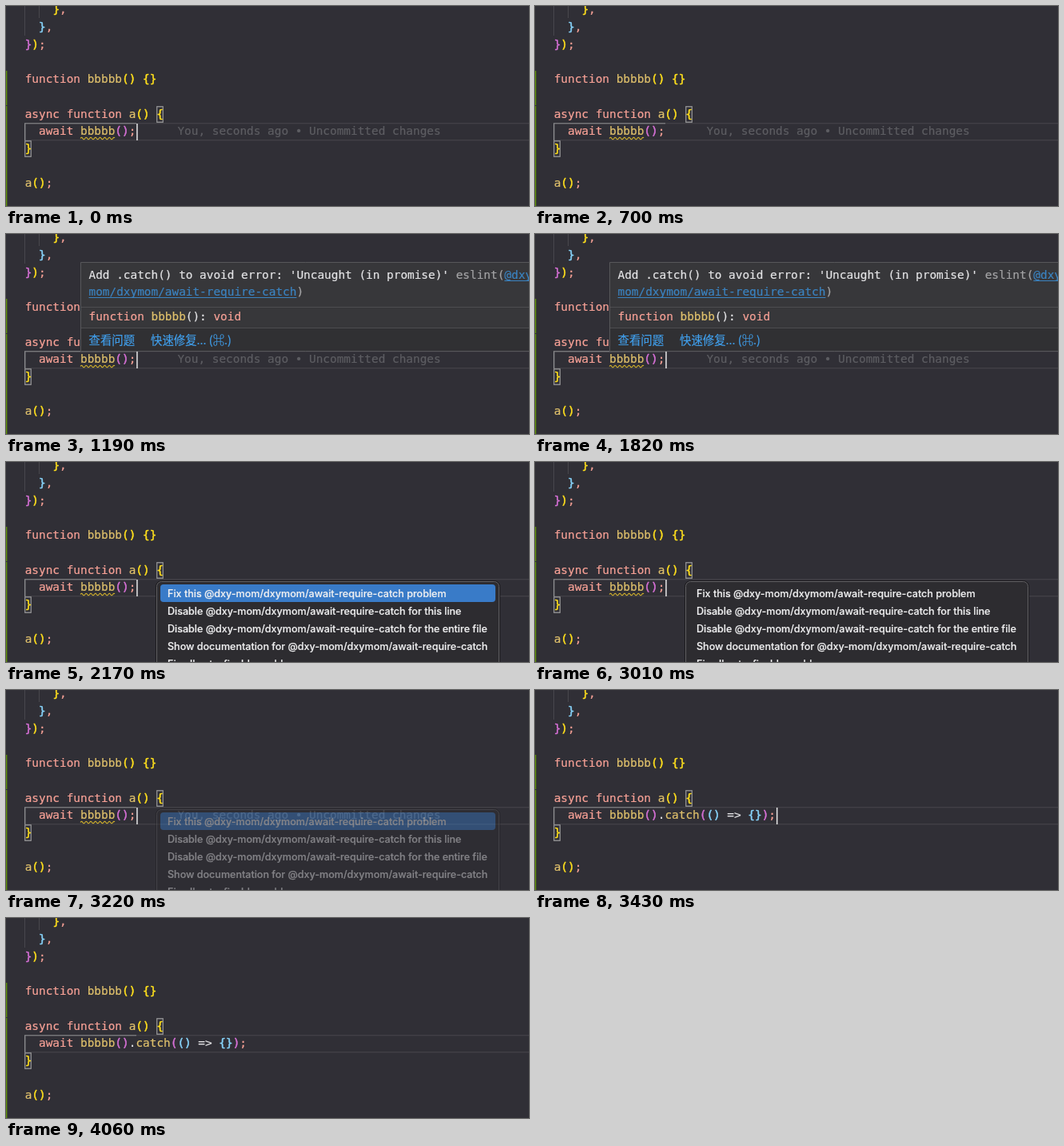
An HTML page with a canvas that plays this animation: 654 px wide and 250 px high, repeating every 4.2 s.

```html
<!DOCTYPE html>
<html lang="en">
<head>
<meta charset="utf-8">
<title>Editor quick fix</title>
<style>
  html, body { margin: 0; width: 100%; height: 100%; overflow: hidden; background: #302f36; }
  canvas { display: block; }
</style>
</head>
<body>
<canvas id="stage" width="654" height="250"></canvas>
<script>
const ctx = document.getElementById('stage').getContext('2d');

const LOOP = 4200;
const HOVER_IN = 960, MENU_IN = 1960, SELECT = 2100;
const FLASH_OFF = 3010, FLASH_ON = 3080, MENU_OUT = 3150, MENU_GONE = 3275;
const EDIT = 3430, LAST_BLINK = 3850;

const MONO = '14.4px "DejaVu Sans Mono", monospace';
const MENU = '500 12.56px Inter, sans-serif';
const ACTION = '14.4px "Noto Sans CJK SC", "Noto Sans CJK", "DejaVu Sans", sans-serif';

const LEFT = 23.7, COLUMN = 8.669, ROW = 21.7, HAIRLINE = 1.4;
const KEY = '#f7a196', NAME = '#e0c16c', PLAIN = '#e4e4e6', LINK = '#3b83c0';
const GOLD = '#ffdf1c', ORCHID = '#d670d6', SKY = '#87d3fa';

const column = n => LEFT + n * COLUMN;
const center = row => 4.8 + row * ROW;
const clamp = v => Math.max(0, Math.min(1, v));

function rect(x, y, w, h, color) {
  ctx.fillStyle = color;
  ctx.fillRect(x, y, w, h);
}

function outline(x, y, w, h, color, width = 1) {
  ctx.strokeStyle = color;
  ctx.lineWidth = width;
  ctx.strokeRect(x + width / 2, y + width / 2, w - width, h - width);
}

function rounded(x, y, w, h, r, fill, stroke) {
  ctx.beginPath();
  ctx.roundRect(x, y, w, h, r);
  ctx.fillStyle = fill;
  ctx.fill();
  if (stroke) {
    ctx.strokeStyle = stroke;
    ctx.lineWidth = 1;
    ctx.stroke();
  }
}

// Draws alternating color and text arguments; returns the end position.
// A thin stroke gives glyphs a smoothed weight, heavier for bracket colors.
function write(x, baseline, ...parts) {
  for (let i = 0; i < parts.length; i += 2) {
    const [color, text] = parts.slice(i, i + 2);
    ctx.fillStyle = ctx.strokeStyle = color;
    ctx.lineWidth = [GOLD, ORCHID, SKY].includes(color) ? .5 : .2;
    ctx.fillText(text, x, baseline);
    ctx.strokeText(text, x, baseline);
    x += ctx.measureText(text).width;
  }
  return x;
}

const code = (row, col, ...parts) => write(column(col), center(row) + 4.6, ...parts);

function squiggle(x1, x2, y) {
  ctx.beginPath();
  for (let x = x1; x <= x2; x += .5) ctx.lineTo(x, y - 1.2 * Math.sin((x - x1) * Math.PI / 2.9));
  ctx.strokeStyle = '#d0b02c';
  ctx.lineWidth = 1.1;
  ctx.stroke();
}

function cursorVisible(t) {
  if (t >= EDIT) return t < LAST_BLINK;
  return t >= MENU_IN || (t + 245) % 1000 < 500;
}

function drawEditor(t) {
  const edited = t >= EDIT;
  ctx.font = MONO;
  ctx.lineJoin = 'round';
  rect(0, 0, 654, 250, '#302f36');
  rect(0, 81, HAIRLINE, 43, '#5f8f0c');
  rect(0, 125, HAIRLINE, 125, '#5f8f0c');
  rect(23, 0, 1, 37, '#48474d');
  rect(41, 0, 1, 15, '#48474d');

  rect(24, 146, 630, HAIRLINE, '#414046');
  rect(24, 167, 630, HAIRLINE, '#414046');
  rect(23, 146, HAIRLINE, 22, '#8b8b8d');
  rect(23, 146, 140, HAIRLINE, '#77777a');
  outline(188, 125, 9, 21, '#8b8b8d', HAIRLINE);
  outline(23, 168, 9, 21, '#8b8b8d', HAIRLINE);

  code(0, 4, GOLD, '}', KEY, ',');
  code(1, 2, SKY, '}', KEY, ',');
  code(2, 0, ORCHID, '}', GOLD, ')', KEY, ';');
  code(4, 0, KEY, 'function ', NAME, 'bbbbb', GOLD, '() {}');
  code(6, 0, KEY, 'async function ', NAME, 'a', GOLD, '() {');
  code(7, 2, KEY, 'await ', NAME, 'bbbbb', ORCHID, '()');
  code(8, 0, GOLD, '}');
  code(10, 0, NAME, 'a', GOLD, '()', KEY, ';');

  if (edited) {
    code(7, 15, PLAIN, '.', NAME, 'catch', ORCHID, '(', SKY, '()', PLAIN, ' => ',
      SKY, '{}', ORCHID, ')', KEY, ';');
  } else {
    code(7, 15, KEY, ';');
    squiggle(93, 136, 165.5);
    code(7, 22, '#5d5d62', 'You, seconds ago • Uncommitted changes');
  }
  if (cursorVisible(t)) rect(column(edited ? 32 : 16) + .8, 147, 1.5, 21, '#e8e8e8');
}

function drawHover() {
  rect(93, 35, 570, 112, '#37373a');
  rect(94, 118, 560, 28, '#303033');
  outline(93, 35, 570, 112, '#57575a');
  rect(94, 91, 560, 1, '#4d4d50');
  rect(94, 117, 560, 1, '#4d4d50');

  ctx.font = MONO;
  const linkX = write(103.5, 56, PLAIN, "Add .catch() to avoid error: 'Uncaught (in promise)' ",
    '#a3a3a5', 'eslint(');
  write(linkX, 56, LINK, '@dxy-');
  rect(linkX, 58, 654 - linkX, 1, LINK);
  const linkEnd = write(103.5, 77, LINK, 'mom/dxymom/await-require-catch');
  rect(103.5, 79, linkEnd - 103.5, 1, LINK);
  write(linkEnd, 77, '#a3a3a5', ')');
  write(103.5, 108, KEY, 'function ', NAME, 'bbbbb', PLAIN, '(): ', KEY, 'void');

  ctx.font = ACTION;
  write(103.5, 138, '#409fec', '查看问题');
  write(181, 138, '#409fec', '快速修复... (⌘.)');
}

function drawMenu(selected) {
  rounded(187.5, 148.5, 430, 130, 7, '#1d1c1f', '#1d1c1f');
  rounded(188.5, 149.5, 428, 130, 6, '#2d2c30', '#626165');
  if (selected) rounded(193, 153, 419, 22, 4, '#397bc8');
  ctx.font = MENU;
  const rule = '@dxy-mom/dxymom/await-require-catch';
  [
    `Fix this ${rule} problem`,
    `Disable ${rule} for this line`,
    `Disable ${rule} for the entire file`,
    `Show documentation for ${rule}`,
    'Fix all auto-fixable problems'
  ].forEach((label, i) => write(202, 168.7 + 22 * i, '#f0f0f1', label));
}

// Flattens a panel before fading so that its layers do not show through each other.
const panel = document.createElement('canvas');
panel.width = 654;
panel.height = 250;

function fade(alpha, t, draw) {
  draw();
  if (alpha >= 1) return;
  panel.getContext('2d').drawImage(ctx.canvas, 0, 0);
  drawEditor(t);
  ctx.globalAlpha = alpha;
  ctx.drawImage(panel, 0, 0);
  ctx.globalAlpha = 1;
}

function frame() {
  const t = performance.now() % LOOP;
  drawEditor(t);
  if (t >= HOVER_IN && t < MENU_IN) {
    fade(clamp((t - HOVER_IN) / 100), t, drawHover);
  } else if (t >= MENU_IN && t < MENU_GONE) {
    const selected = t >= SELECT && (t < FLASH_OFF || t >= FLASH_ON);
    fade(1 - clamp((t - MENU_OUT) / (MENU_GONE - MENU_OUT)), t, () => drawMenu(selected));
  }
  requestAnimationFrame(frame);
}
frame();
</script>
</body>
</html>
```
